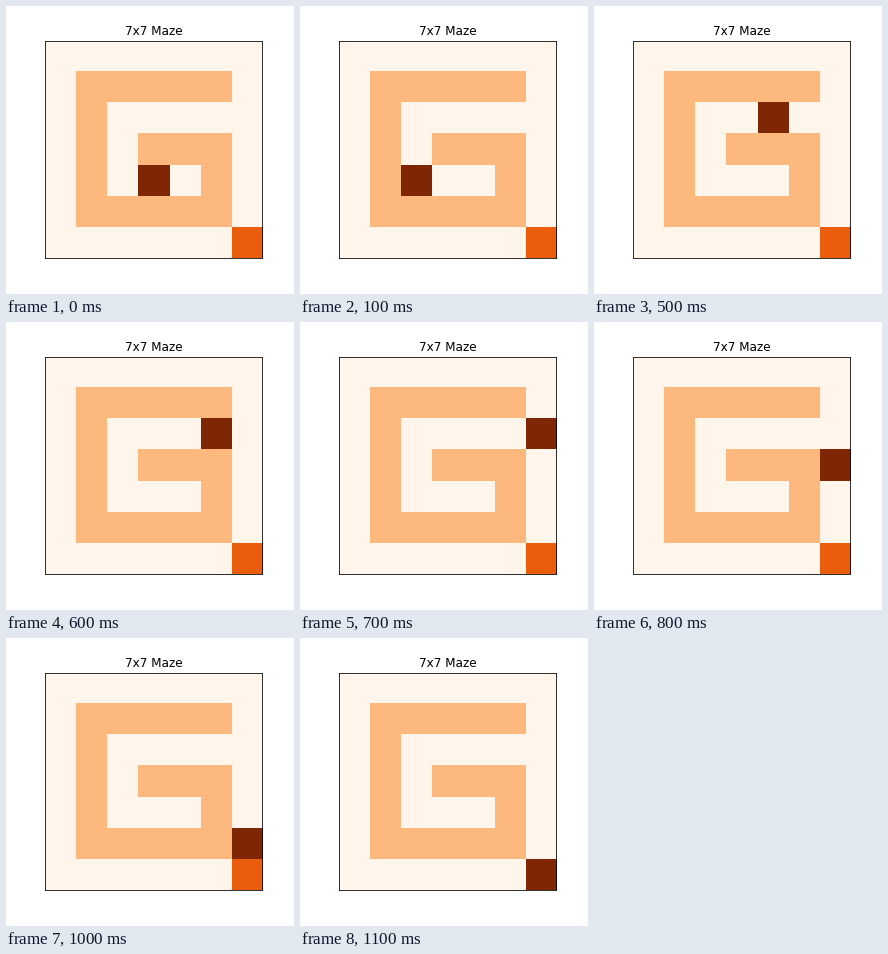
A matplotlib script that plays this animation: 288 px wide and 288 px high, repeating every 1.2 s.

```python
import numpy as np
import matplotlib.pyplot as plt
from matplotlib.animation import FuncAnimation

WALL, GOAL, PLAYER = 1, 2, 3

plt.rcParams["font.family"] = "DejaVu Sans"

maze = np.array([[int(c) for c in row] for row in (
    "0000000",
    "0111110",
    "0100000",
    "0101110",
    "0100010",
    "0111110",
    "0000002",
)])

# Up, right and down through the corridor to the goal
START = (4, 3)
MOVES = "LUURRRRDDDD"
STEP = {"L": (0, -1), "R": (0, 1), "U": (-1, 0), "D": (1, 0)}

path = [START]
for m in MOVES:
    dr, dc = STEP[m]
    r, c = path[-1]
    path.append((r + dr, c + dc))


def board(i):
    grid = maze.copy()
    grid[path[i]] = PLAYER
    return grid


fig, ax = plt.subplots(figsize=(4, 4), dpi=72, facecolor="white")
fig.subplots_adjust(left=0.125, right=0.9, bottom=0.125, top=0.88)
ax.set_title("7x7 Maze", fontsize=12)
ax.set_xticks([])
ax.set_yticks([])
img = ax.imshow(board(0), cmap="Oranges", vmin=0, vmax=PLAYER,
                interpolation="nearest")


def update(i):
    img.set_data(board(i))
    return [img]


anim = FuncAnimation(fig, update, frames=len(path), interval=100,
                     repeat=True, repeat_delay=0, blit=False)
plt.show()
```
